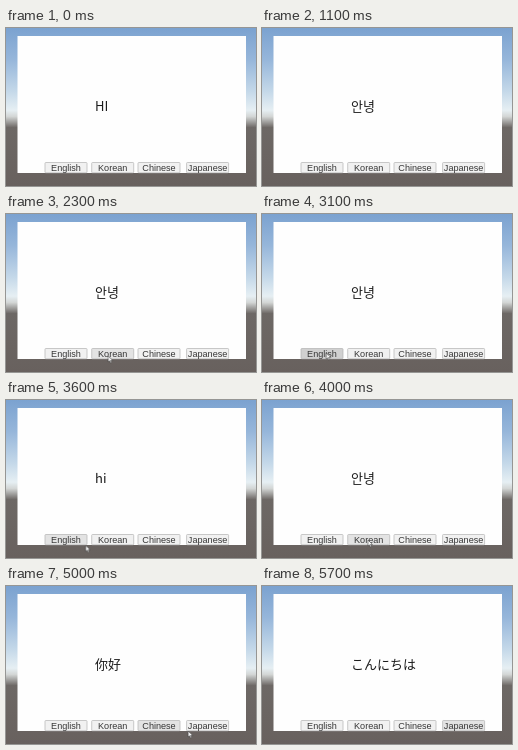
An HTML page that plays this animation: 250x158 px, repeating every 6000 ms.

```html
<!DOCTYPE html>
<html lang="en">
<head>
<meta charset="utf-8">
<title>Language switcher</title>
<style>
html, body { margin: 0; width: 100%; height: 100%; overflow: hidden; }
svg { display: block; width: 100vw; height: 100vh; }

/* every state change is a hard cut */
.greet text, .btn rect, #cursor { animation: 6s step-end infinite; }

.greet { font: 13px "Noto Sans CJK JP", "Noto Sans", sans-serif; fill: #1c1c1c; }
.greet text { opacity: 0; }
#start { animation-name: start; }
#ko { animation-name: ko; font-family: "Noto Sans CJK KR", "Noto Sans CJK JP", sans-serif; }
#en { animation-name: en; }
#zh { animation-name: zh; font-family: "Noto Sans CJK SC", "Noto Sans CJK JP", sans-serif; }
#ja { animation-name: ja; }

@keyframes start { 0% { opacity: 1 } 18.333%, 100% { opacity: 0 } }
@keyframes ko {
  0%, 53.333%, 76.666%, 100% { opacity: 0 }
  18.333%, 66.666% { opacity: 1 }
}
@keyframes en { 0%, 66.666%, 100% { opacity: 0 } 53.333% { opacity: 1 } }
@keyframes zh { 0%, 90%, 100% { opacity: 0 } 76.666% { opacity: 1 } }
@keyframes ja { 0% { opacity: 0 } 90%, 100% { opacity: 1 } }

.btn { --normal: #f1f1f1; --selected: #e3e3e3; --pressed: #d0d0d0; }
.btn rect { fill: var(--normal); stroke: #b4b4b4; stroke-width: .7; }
.btn text { font: 9.1px "Liberation Sans", Arial, sans-serif; fill: #363636; text-anchor: middle; }
#bEn rect { animation-name: pickEn; }
#bKo rect { animation-name: pickKo; }
#bZh rect { animation-name: pickZh; }
#bJa rect { animation-name: pickJa; }

@keyframes pickEn {
  0%, 65%, 100% { fill: var(--normal) }
  51.666% { fill: var(--pressed) }
  53.333% { fill: var(--selected) }
}
@keyframes pickKo {
  0%, 51.666%, 73.333%, 100% { fill: var(--normal) }
  36.666%, 65% { fill: var(--pressed) }
  38.333%, 66.666% { fill: var(--selected) }
}
@keyframes pickZh {
  0%, 88.333%, 100% { fill: var(--normal) }
  73.333% { fill: var(--pressed) }
  76.666% { fill: var(--selected) }
}
@keyframes pickJa {
  0% { fill: var(--normal) }
  88.333% { fill: var(--pressed) }
  90%, 100% { fill: var(--selected) }
}

#cursor { fill: #fff; stroke: #444; stroke-width: .6; opacity: 0; animation-name: point; }
@keyframes point {
  0% { opacity: 0; transform: translate(109px, 123px) }
  25% { opacity: 1; transform: translate(109px, 123px) }
  26.666% { opacity: 0; transform: translate(109px, 123px) }
  30% { opacity: 1; transform: translate(99.5px, 151px) }
  31.666% { opacity: 1; transform: translate(102.3px, 142px) }
  48.333% { opacity: 1; transform: translate(92px, 141px) }
  50% { opacity: 1; transform: translate(76px, 140px) }
  51.666% { opacity: 1; transform: translate(64.3px, 139px) }
  60% { opacity: 1; transform: translate(79.7px, 145.4px) }
  61.666% { opacity: 1; transform: translate(94px, 142px) }
  63.333% { opacity: 1; transform: translate(106px, 140px) }
  68.333% { opacity: 1; transform: translate(118px, 140px) }
  70% { opacity: 1; transform: translate(133px, 139px) }
  71.666% { opacity: 1; transform: translate(154.3px, 137.3px) }
  81.666% { opacity: 1; transform: translate(169px, 141px) }
  83.333% { opacity: 1; transform: translate(182.2px, 145px) }
  85% { opacity: 1; transform: translate(191px, 141px) }
  86.666% { opacity: 1; transform: translate(198.3px, 138px) }
  93.333% { opacity: .5; transform: translate(198.3px, 138px) }
  95%, 100% { opacity: 0; transform: translate(198.3px, 138px) }
}
</style>
</head>
<body>
<svg viewBox="0 0 250 158">
  <defs>
    <linearGradient id="sky" x2="0" y2="1">
      <stop offset="0" stop-color="#7ba2d0"/>
      <stop offset=".2" stop-color="#96b6da"/>
      <stop offset=".4" stop-color="#c4d8e9"/>
      <stop offset=".52" stop-color="#e6eff3"/>
      <stop offset=".56" stop-color="#d3d6d5"/>
      <stop offset=".63" stop-color="#6d6865"/>
      <stop offset="1" stop-color="#68615e"/>
    </linearGradient>
  </defs>
  <rect width="250" height="158" fill="url(#sky)"/>
  <rect x="11.5" y="8" width="228.5" height="137" fill="#fefefe"/>

  <g class="greet">
    <text id="start" x="89" y="82.5">HI</text>
    <text id="ko" x="89" y="82.5">안녕</text>
    <text id="en" x="89" y="82.5">hi</text>
    <text id="zh" x="89" y="82.5">你好</text>
    <text id="ja" x="89" y="82.5">こんにちは</text>
  </g>

  <g class="btn" id="bEn" transform="translate(39 134.5)">
    <rect width="42" height="10.3" rx=".8"/><text x="21" y="8.3">English</text>
  </g>
  <g class="btn" id="bKo" transform="translate(85.7 134.5)">
    <rect width="42" height="10.3" rx=".8"/><text x="21" y="8.3">Korean</text>
  </g>
  <g class="btn" id="bZh" transform="translate(132 134.5)">
    <rect width="42" height="10.3" rx=".8"/><text x="21" y="8.3">Chinese</text>
  </g>
  <g class="btn" id="bJa" transform="translate(180.6 134.5)">
    <rect width="42" height="10.3" rx=".8"/><text x="21" y="8.3">Japanese</text>
  </g>

  <path id="cursor" d="M0 0V6L1.4 4.8L2.4 7L3.4 6.5L2.5 4.5H4.4Z"/>
</svg>
</body>
</html>
```
